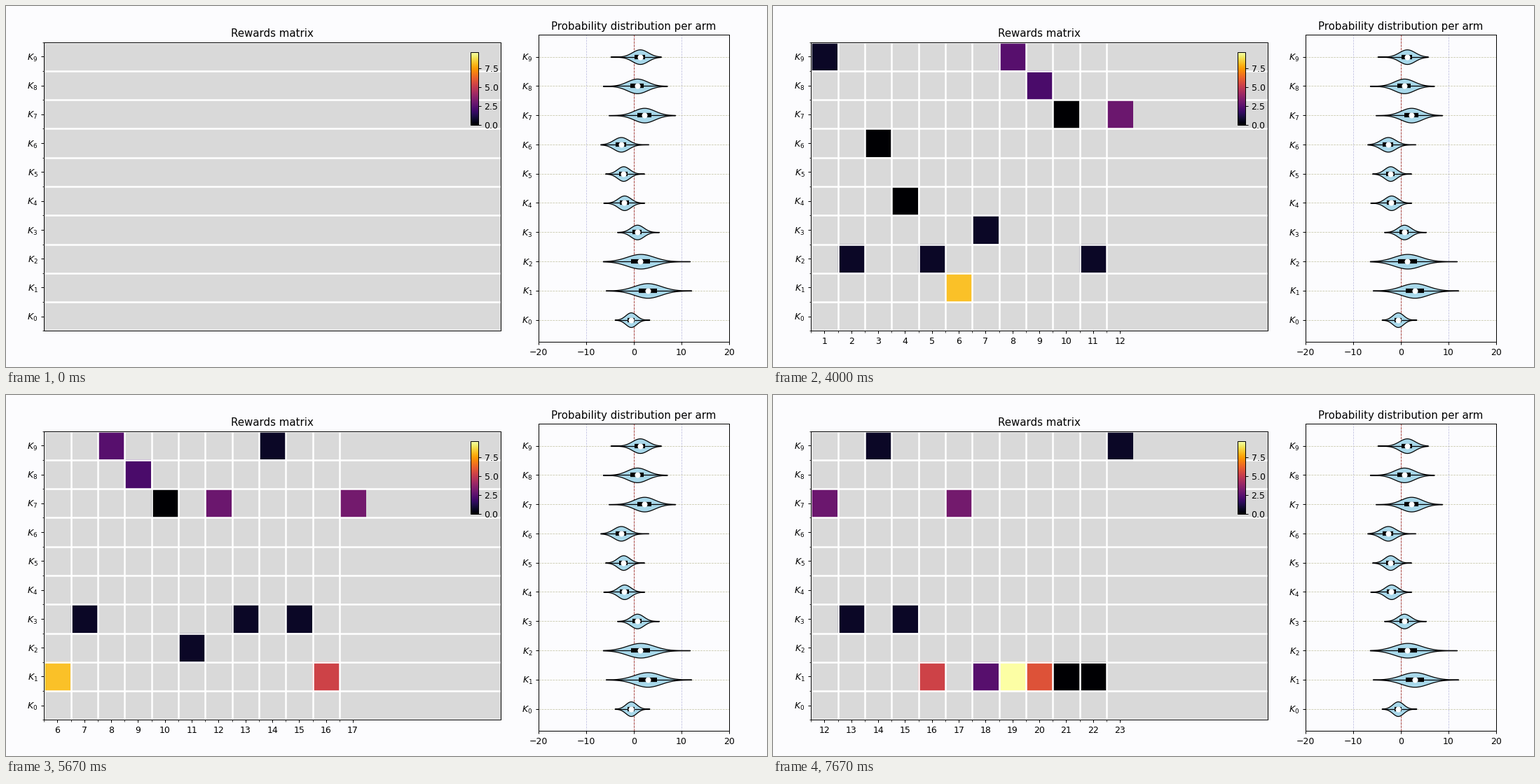
Write a matplotlib script that moves like this. It is 1086 px wide and 516 px high and loops after 8 s.

```python
import numpy as np
import matplotlib.pyplot as plt
from matplotlib.animation import FuncAnimation

DPI, W, H = 90, 1086, 516
TICKS, TICK_MS = 80, 100
ROUNDS, ARMS, COLS, WINDOW = 24, 10, 17, 12
VMAX = 9.58
PAPER, EMPTY = "#fcfcfe", "#d9d9d9"

# Smallest, median and largest reward of each arm, from K_0 up
SPREAD = [(-4, -0.6, 3.3), (-5.9, 2.9, 12.1), (-6.5, 1.4, 11.8),
          (-3.5, 0.7, 5.3), (-6.4, -2, 2.2), (-6, -2.2, 2.2),
          (-7, -2.7, 3.1), (-5.3, 2.2, 8.7), (-6.5, 0.7, 7), (-4.9, 1.3, 5.7)]

# Explore first, then mostly stay with the best arm
CHOICES = [9, 2, 6, 4, 2, 1, 3, 9, 8, 7, 2, 7, 3, 9, 3] + [1, 7] + [1] * 5 + [9]
# Rounds that paid well
WINS = {6: 8.2, 8: 2.4, 9: 2.1, 12: 2.9, 16: 5.3,
        17: 3.1, 18: 2.4, 19: VMAX, 20: 5.8}


def reward(rnd):
    """Outside the wins, only mildly positive arms pay a little."""
    median = SPREAD[CHOICES[rnd - 1]][1]
    return WINS.get(rnd, 0.65 if 0 < median < 2 else 0)


def label_arms(ax):
    ax.set_yticks(range(ARMS), [f"$K_{i}$" for i in range(ARMS)])


def draw_violin(ax, arm, lo, mid, hi):
    sigma = (hi - lo) / 6.4
    quartile = 0.674 * sigma
    x = np.linspace(lo, hi, 160)
    half = 0.25 * np.exp(-0.5 * ((x - mid) / sigma) ** 2)
    ax.fill_between(x, arm - half, arm + half, facecolor="#a8d8ea",
                    edgecolor="black", lw=1, zorder=2)
    ax.hlines(arm, lo, hi, color="black", lw=1, zorder=3)
    ax.hlines(arm, mid - quartile, mid + quartile, color="black", lw=5, zorder=3)
    ax.scatter(mid, arm, s=30, color="white", zorder=4)


fig = plt.figure(figsize=(W / DPI, H / DPI), dpi=DPI, facecolor=PAPER)

# Rewards matrix
ax = fig.add_axes([0.05, 0.1, 0.6, 0.8])
cmap = plt.get_cmap("inferno").with_extremes(bad=EMPTY)
im = ax.imshow(np.full((ARMS, COLS), np.nan), cmap=cmap, vmin=0, vmax=VMAX,
               origin="lower", aspect="auto", interpolation="nearest")
ax.set_title("Rewards matrix")
label_arms(ax)
ax.set_yticks(np.arange(ARMS + 1) - 0.5, minor=True)
ax.grid(which="minor", color="white", lw=2)

cax = fig.add_axes([662.7 / W, 1 - 169.6 / H, 11.1 / W, 103.2 / H])
fig.colorbar(im, cax=cax, ticks=np.arange(0, VMAX, 2.5))

# Reward distributions
dist = fig.add_axes([0.7, 0.07, 0.25, 0.85], facecolor=PAPER)
dist.set_title("Probability distribution per arm")
dist.set_xlim(-20, 20)
dist.set_ylim(-0.75, ARMS - 0.25)
dist.set_xticks(range(-20, 21, 10))
label_arms(dist)
dist.set_axisbelow(True)
dist.grid(axis="x", color="#bcbce0", ls="--", lw=0.6)
dist.grid(axis="y", color="#c4c4a4", ls="--", lw=0.6)
dist.axvline(0, color="#a83c32", ls="--", lw=0.7, zorder=1)
for arm, spread in enumerate(SPREAD):
    draw_violin(dist, arm, *spread)


def update(tick):
    # A round is shown from the tick in which it starts
    last = ((tick + 1) * ROUNDS - 1) // TICKS
    first = max(1, last - WINDOW + 1)
    rounds = range(first, last + 1)
    grid = np.full((ARMS, COLS), np.nan)
    for rnd in rounds:
        grid[CHOICES[rnd - 1], rnd - first] = reward(rnd)
    im.set_data(np.ma.masked_invalid(grid))
    cols = np.arange(len(rounds))
    ax.set_xticks(cols, [str(rnd) for rnd in rounds])
    ax.set_xticks(cols - 0.5, minor=True)
    ax.set_xlim(-0.5, COLS - 0.5)
    return [im]


anim = FuncAnimation(fig, update, frames=TICKS, interval=TICK_MS,
                     repeat=True, repeat_delay=0, blit=False)
plt.show()
```
